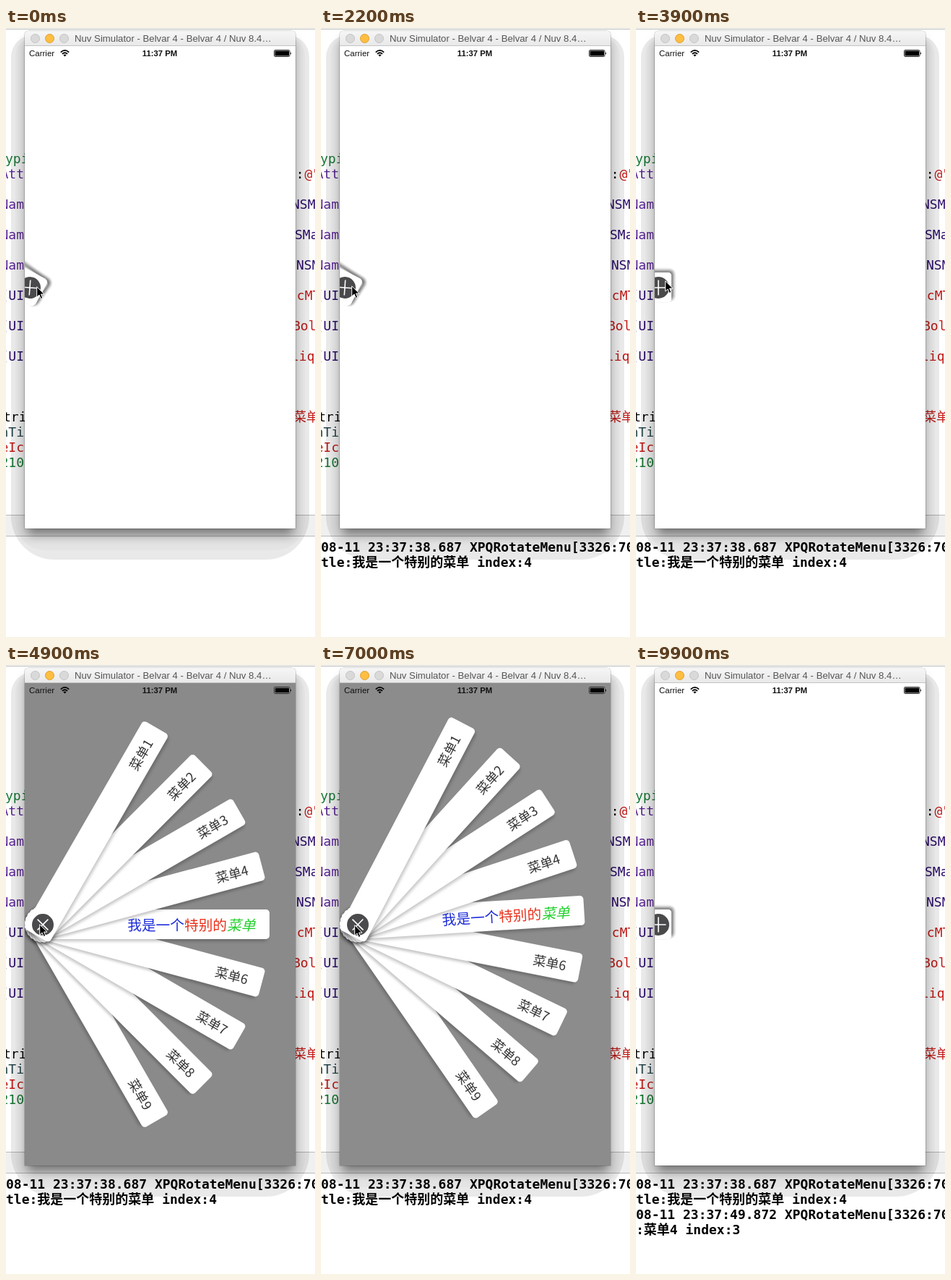
Animation of 428 by 842 pixels, one loop 10000 ms. Source, as an HTML page:

```html
<!DOCTYPE html>
<html lang="zh">
<head>
<meta charset="utf-8">
<title>Rotate menu</title>
<style>
  html, body { margin: 0; width: 100%; height: 100%; overflow: hidden; background: #fff; }
  #stage { position: relative; width: 428px; height: 842px; overflow: hidden; background: #fff; }
  #stage div, #stage svg { position: absolute; }
  .code { font: 18px/21px "DejaVu Sans Mono", "Noto Sans CJK SC", monospace; white-space: pre; }
  .log { left: 0; font-weight: bold; color: #000; }
  .rule { left: 0; top: 1px; width: 428px; height: 1px; background: #b9b9b9; }
  .divider { left: 0; top: 673px; width: 428px; height: 28px; background: #f0f0f0; border: solid #b8b8b8; border-width: 1px 0; }
  .halo { left: 7px; top: 10px; width: 413px; height: 725px; border-radius: 30px 30px 60px 60px; background: rgba(0,0,0,.085); }
  .halo.inner { left: 13px; top: 14px; width: 401px; height: 708px; border-radius: 24px 24px 40px 40px; background: rgba(0,0,0,.02); }
  .window { left: 26px; top: 4px; width: 375px; height: 688px; border-radius: 5px 5px 0 0; background: #fff;
            box-shadow: 0 0 0 .5px rgba(0,0,0,.3), 0 11px 15px -3px rgba(0,0,0,.48); }
  .bar { left: 0; top: 0; width: 375px; height: 20px; border-radius: 5px 5px 0 0; border-bottom: 1px solid #c4c4c4;
         background: linear-gradient(#f6f6f6, #e9e9e9); box-sizing: border-box; height: 21px; }
  .dot { top: 4px; width: 11px; height: 11px; border-radius: 50%; background: #d9d9d9; border: .5px solid #c3c3c3; }
  .title { left: 69px; top: 1px; font: 13.2px/19px "Liberation Sans", sans-serif; color: #555; white-space: pre; }
  .screen { left: 0; top: 21px; width: 375px; height: 667px; overflow: hidden; background: #fff; }
  #shade { inset: 0; background: #000; }
  .status { font: 11.5px/20px "Liberation Sans", sans-serif; color: #111; white-space: pre; }
  #hub { top: 333.5px; }
  .card { left: -18px; top: -20.5px; width: 332px; height: 41px; box-sizing: border-box; padding-right: 20px;
          border-radius: 5px; background: #fff; transform-origin: 18px 20.5px; text-align: right;
          font: 18px/41px "Noto Sans CJK SC", sans-serif; color: #333; white-space: nowrap; }
  .card.rich { font-size: 19.7px; }
  #button { left: -15px; top: -15px; }
</style>
</head>
<body>
<div id="stage">
  <div class="rule"></div>
  <div id="editor"></div>
  <div class="divider"></div>
  <div id="console"></div>
  <div class="halo"></div>
  <div class="halo inner"></div>
  <div class="window">
    <div class="bar">
      <div class="dot" style="left:8px"></div>
      <div class="dot" style="left:28px;background:#fdbe41;border-color:#e0a032"></div>
      <div class="dot" style="left:48px"></div>
      <div class="title">Nuv Simulator - Belvar 4 - Belvar 4 / Nuv 8.4…</div>
    </div>
    <div class="screen">
      <div id="shade"></div>
      <div id="hub">
        <svg id="button" width="30" height="30">
          <circle cx="15" cy="15" r="15" fill="#4a4a4c"/>
          <path d="M15 4.5v21M4.5 15h21" stroke="#fff" stroke-width="1.6"/>
        </svg>
      </div>
      <div class="status" style="left:6px;top:0">Carrier</div>
      <svg style="left:49px;top:5px" width="13" height="10" fill="none" stroke="#000" stroke-width="1.7">
        <path d="M.8 3.6Q6.5-1.7 12.2 3.6M2.9 5.9Q6.5 2.6 10.1 5.9"/>
        <path d="M6.5 9.4L4.4 7.3Q6.5 5.8 8.6 7.3Z" fill="#000" stroke="none"/>
      </svg>
      <div class="status" style="left:0;width:374px;top:0;text-align:center;font-weight:bold;font-size:11.3px">11:37 PM</div>
      <svg style="left:345px;top:5px" width="25" height="10">
        <rect x=".5" y=".5" width="21.5" height="9" rx="1.5" fill="#fff" stroke="#000" stroke-width=".8"/>
        <rect x="1.5" y="1.5" width="19.5" height="7" fill="#000"/>
        <path d="M23 3.2q2 1.8 0 3.6z"/>
      </svg>
    </div>
  </div>
  <svg id="cursor" style="left:0;top:0" width="14" height="20">
    <path d="M.7 .8V15L4 12L6.3 17.4L8.8 16.3L6.5 11.1H11Z" fill="#000" stroke="#fff" stroke-width="1"/>
  </svg>
</div>
<script>
const LOOP = 10000, STEP = 100, MOVE = 600, COUNT = 9;
const $ = id => document.getElementById(id);

function add(parent, cls, text, css = {}) {
  const el = document.createElement('div');
  el.className = cls;
  el.innerHTML = text;
  Object.assign(el.style, css);
  parent.append(el);
  return el;
}

// Editor fragments: x, centre y, colour, text
const purple = '#5c2699', navy = '#2e0d6e', red = '#c41a16', green = '#177a35', teal = '#26474b';
[
  [-1, 181, green, 'ypic'], [-7.5, 202, purple, 'Attr'],
  [-7.5, 244, purple, 'Name'], [-7.5, 286, purple, 'Name'], [-7.5, 328, purple, 'Name'],
  [-7.5, 370, navy, '[UIF'], [-7.5, 412, navy, '[UIF'], [-7.5, 454, navy, '[UIF'],
  [-4, 538, '#000', 'trin'], [-7.5, 559, teal, 'nTit'], [-7.5, 580, red, 'eIco'], [-7.5, 601, green, '2105'],
  [391, 202, '#000', 'g:'], [413.5, 202, red, '@"'],
  [396, 244, navy, 'NSMa'], [400, 286, navy, 'SMak'], [402, 328, navy, 'NSMa'],
  [392, 370, red, 'lcMT'], [397, 412, red, 'Bold'], [395, 454, red, 'liqu'], [398, 538, red, '菜单']
].forEach(([x, y, color, text]) =>
  add($('editor'), 'code', text, { left: x + 'px', top: y - 11 + 'px', color }));

// Console lines: time, top, text
const logs = [
  [1300, 707, '08-11 23:37:38.687 XPQRotateMenu[3326:70'],
  [1300, 728, 'tle:我是一个特别的菜单 index:4'],
  [9000, 749, '08-11 23:37:49.872 XPQRotateMenu[3326:70'],
  [9000, 770, ':菜单4 index:3']
].map(([time, top, text]) => ({ time, el: add($('console'), 'code log', text, { top: top + 'px' }) }));

// The first card lies on top of the stack
const rich = '<span style="color:#1c2bd8">我是一个</span>' +
  '<span style="color:#e8321c;font-weight:500">特别的</span>' +
  '<span style="color:#22d02c;font-style:italic">菜单</span>';
const cards = [];
for (let i = COUNT - 1; i >= 0; i--)
  cards[i] = add($('hub'), i === 4 ? 'card rich' : 'card', i === 4 ? rich : '菜单' + (i + 1));
$('hub').append($('button'));

// Taps alternately open and close the menu
const taps = [-115, 1250, 2090, 3050, 3950, 4950, 5850, 6950, 7745, 8950];
const path = [
  [0, 42, 357], [300, 42, 357], [1050, 235, 345], [1350, 235, 345], [1850, 42, 356], [2300, 42, 356],
  [2700, 46, 358], [3150, 46, 358], [3700, 40, 349], [4000, 40, 349], [4500, 46, 358], [5050, 46, 358],
  [5600, 39, 352], [5950, 39, 352], [6500, 46, 359], [7050, 46, 359], [7500, 38, 360], [8050, 38, 360],
  [8750, 310, 268], [9100, 310, 268], [9700, 345, -30], [LOOP, 345, -30]
];

const smooth = u => { u = Math.min(1, Math.max(0, u)); return u * u * (3 - 2 * u); };
const mix = (a, b, u) => a + (b - a) * u;

function openness(t) {
  const i = taps.findLastIndex(s => s <= t);
  const e = smooth((t - taps[i]) / MOVE);
  return i % 2 ? 1 - e : e;
}

function pointer(t) {
  const i = path.findIndex(p => p[0] > t);
  const [t0, x0, y0] = path[i - 1], [t1, x1, y1] = path[i];
  const u = smooth((t - t0) / (t1 - t0));
  return [mix(x0, x1, u), mix(y0, y1, u)];
}

function draw(t) {
  const q = openness(t);
  // The stack swings out slightly ahead of the spread
  const swing = q + 2.6 * q * (1 - q) ** 6;
  $('hub').style.left = mix(5, 25.4, q) + 'px';
  $('button').style.transform = `rotate(${45 * q}deg)`;
  $('shade').style.opacity = 0.46 * Math.max(0, (q - 0.1) / 0.9);
  const shadow = `-3px 3px 4px rgba(0,0,0,${mix(0.075, 0.23, q)})`;
  cards.forEach((card, i) => {
    card.style.transform = `rotate(${-180 + 120 * swing + 120 * q * i / (COUNT - 1)}deg)`;
    card.style.boxShadow = shadow;
  });
  const [x, y] = pointer(t);
  $('cursor').style.transform = `translate(${x}px,${y}px)`;
  logs.forEach(({ time, el }) => el.style.visibility = t >= time ? 'visible' : 'hidden');
}

const start = performance.now();
function tick() {
  const t = Math.max(0, performance.now() - start) % LOOP;
  draw(Math.floor(t / STEP) * STEP);
  requestAnimationFrame(tick);
}
tick();
</script>
</body>
</html>
```
